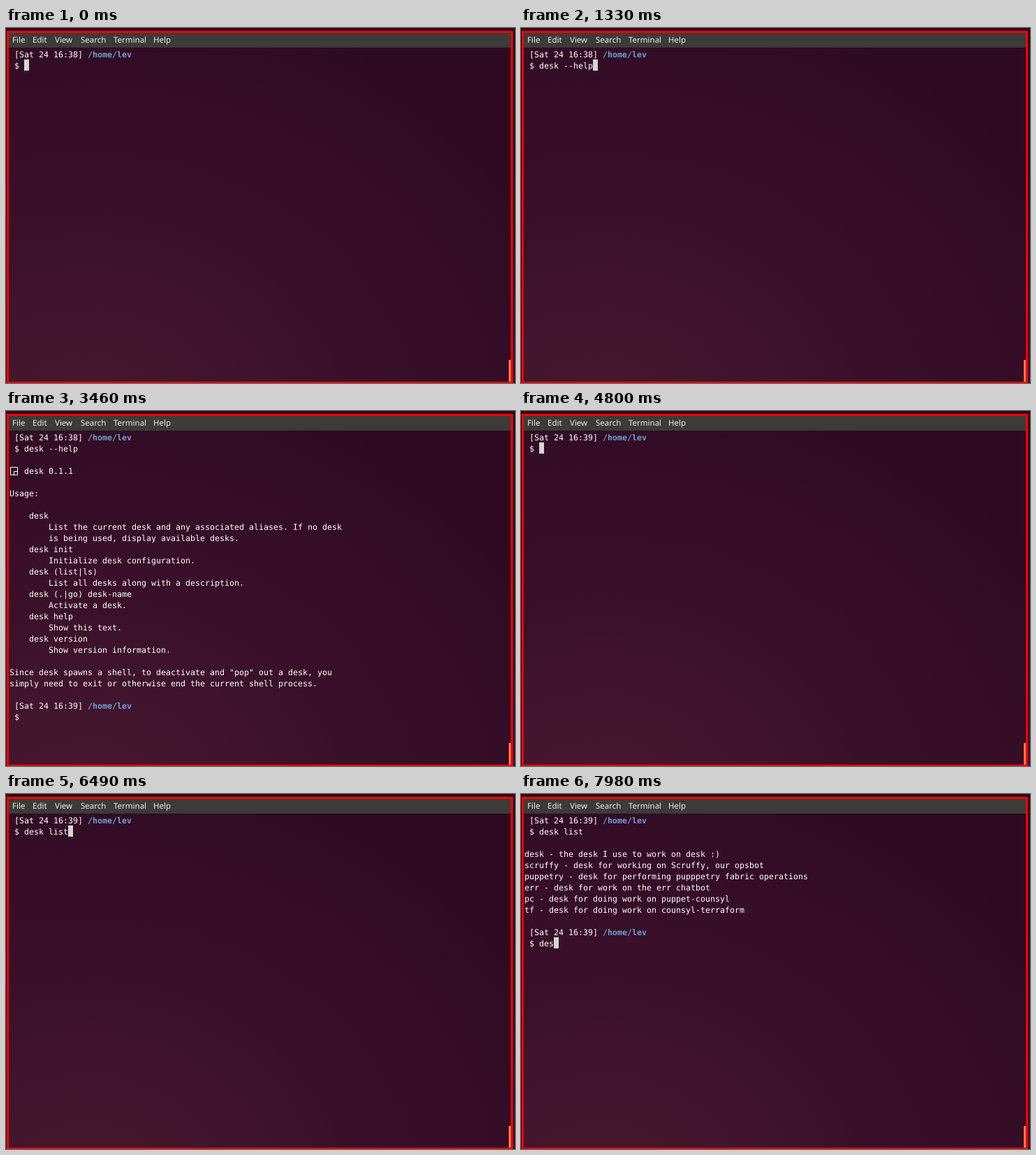
An HTML page that plays this animation: 729 by 508 pixels, repeating every 8000 ms.

```html
<!DOCTYPE html>
<html lang="en">
<head>
<meta charset="utf-8">
<title>Terminal session</title>
<style>
  html, body { margin: 0; width: 100%; height: 100%; overflow: hidden; background: #2a0b20; }
  #stage {
    position: relative; width: 729px; height: 508px; overflow: hidden;
    background: linear-gradient(#2a0b20 40%, #3b1530);
  }
  #window {
    position: absolute; left: 1px; top: 4px; width: 719px; height: 499px;
    border: 3px solid #f00;
    background: radial-gradient(ellipse 760px 640px at 110px 570px,
      #48192f 0%, #41152d 25%, #3a1029 50%, #350d27 75%, #2e0a22 100%);
  }
  #menu { position: absolute; left: 4px; top: 7px; width: 719px; height: 21px; background: #3c3b37; }
  #menu span {
    position: absolute; top: 0; color: #eeece6; white-space: nowrap;
    font: 11.5px/21px "Noto Sans", "Open Sans", sans-serif; text-rendering: geometricPrecision;
  }
  #thumb { position: absolute; left: 720px; top: 475px; width: 3px; height: 31px; background: #f07746; }
  #screen {
    position: absolute; left: 5px; top: 30px; margin: 0; color: #fff;
    font: 11.63px/16px "DejaVu Sans Mono", "Noto Sans Mono", monospace;
    text-rendering: geometricPrecision; font-variant-ligatures: none;
  }
  #screen b { color: #729fcf; }
  #screen i, #screen svg { position: relative; top: -1px; vertical-align: top; }
  #screen i { display: inline-block; width: 7px; height: 16px; background: #d3d7cf; }
  #screen svg { fill: none; stroke: #fff; }
</style>
</head>
<body>
<div id="stage">
  <div id="window"></div>
  <div id="menu">
    <span style="left:5px">File</span><span style="left:34px">Edit</span><span style="left:66px">View</span>
    <span style="left:103px">Search</span><span style="left:150px">Terminal</span><span style="left:207px">Help</span>
  </div>
  <div id="thumb"></div>
  <pre id="screen"></pre>
</div>
<script>
const LOOP = 8000;
const prompt = minute => ` [Sat 24 16:${minute}] <b>/home/lev</b>\n $ `;
const icon = '<svg width="21" height="16"><path d="M1.5 3.5h10v11h-10zM6.5 14.5v-5h5"/></svg>';

const help = `${prompt(38)}desk --help

${icon}desk 0.1.1

Usage:

    desk
        List the current desk and any associated aliases. If no desk
        is being used, display available desks.
    desk init
        Initialize desk configuration.
    desk (list|ls)
        List all desks along with a description.
    desk (.|go) desk-name
        Activate a desk.
    desk help
        Show this text.
    desk version
        Show version information.

Since desk spawns a shell, to deactivate and "pop" out a desk, you
simply need to exit or otherwise end the current shell process.

`;

const list = `${prompt(39)}desk list

desk - the desk I use to work on desk :)
scruffy - desk for working on Scruffy, our opsbot
puppetry - desk for performing pupppetry fabric operations
err - desk for work on the err chatbot
pc - desk for doing work on puppet-counsyl
tf - desk for doing work on counsyl-terraform

`;

const steps = [];
const show = (time, text, cursor = true) => steps.push({ time, html: text + (cursor ? '<i></i>' : '') });
// Each key is [time, number of characters typed so far].
const type = (base, command, keys) =>
  keys.forEach(([time, count]) => show(time, base + command.slice(0, count)));

type(prompt(38), 'desk --help', [
  [0, 0], [40, 1], [220, 2], [300, 3], [390, 4], [550, 5],
  [740, 6], [850, 7], [950, 8], [1060, 9], [1160, 10], [1330, 11]
]);
show(1760, help);
const helpDone = help + prompt(39);
show(1810, helpDone);
show(2270, helpDone, false);
show(2900, helpDone);
show(3460, helpDone, false);

type(prompt(39), 'desk list', [
  [4800, 0], [5050, 1], [5250, 3], [5490, 4], [5900, 5], [6310, 6], [6400, 8], [6490, 9]
]);
show(6590, list);
const listDone = list + prompt(39);
show(6650, listDone);
show(7150, listDone, false);
type(listDone, 'des', [[7650, 1], [7910, 2], [7980, 3]]);

const screen = document.getElementById('screen');
let current;
function render(now) {
  const time = now % LOOP;
  const step = steps.findLast(s => s.time <= time) || steps[0];
  if (step !== current) {
    current = step;
    screen.innerHTML = step.html;
  }
}
function tick() {
  render(performance.now());
  requestAnimationFrame(tick);
}
tick();
</script>
</body>
</html>
```
